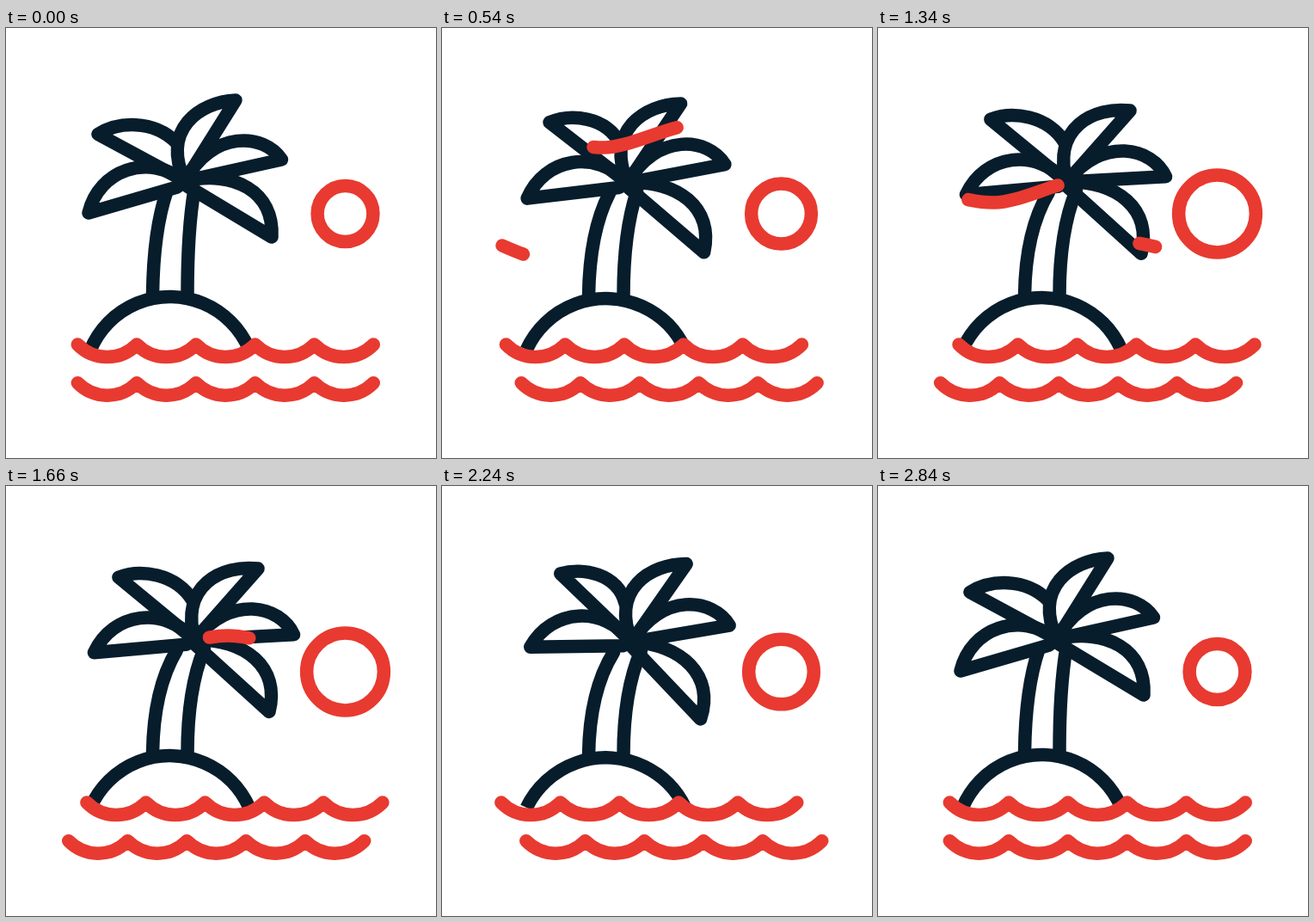
An HTML page with a canvas for the animation above (3 s loop, 500 by 500 pixels).

```html
<!DOCTYPE html>
<html lang="en">
<head>
<meta charset="utf-8">
<title>Island</title>
<style>
  html, body { margin: 0; width: 100%; height: 100%; overflow: hidden; background: #fff; }
  canvas { display: block; width: 500px; height: 500px; }
</style>
</head>
<body>
<canvas id="stage" width="500" height="500"></canvas>
<script>
const ctx = document.getElementById('stage').getContext('2d');
const LOOP = 3000;
const DARK = '#071d2c';
const RED = '#e83a30';

// The motion runs through four equal parts: rest, quarter, middle, quarter, rest.
const START = 500 / 3;
const PART = 2000 / 3;

const clamp = v => Math.min(1, Math.max(0, v));
const smooth = u => u * u * (3 - 2 * u);
const mix = (a, b, u) => a + (b - a) * u;

function sway(time, quarter, middle) {
  const keys = [0, quarter, middle, quarter, 0];
  const pos = Math.min(3.99999, Math.max(0, (time - START) / PART));
  const i = Math.floor(pos);
  return mix(keys[i], keys[i + 1], smooth(pos - i));
}

function swell(time) {
  return smooth(clamp(1 - Math.abs(time - 1500) / (2 * PART)));
}

function turner(hub, degrees) {
  const a = degrees * Math.PI / 180, c = Math.cos(a), s = Math.sin(a);
  return (x, y) => [hub[0] + x * c - y * s, hub[1] + x * s + y * c];
}

// A leaf runs from its root along the straight edge to the tip, then back along the curve.
function leaf(hub, root, tip, c1, c2, end) {
  ctx.beginPath();
  ctx.moveTo(...hub);
  ctx.lineTo(...root);
  ctx.lineTo(...tip);
  ctx.bezierCurveTo(...c1, ...c2, ...end);
  ctx.stroke();
}

function drawCrown(time, hub) {
  const loose = turner(hub, sway(time, 16, 10.3));
  const firm = turner(hub, sway(time, 3, 10.5));
  leaf(hub, hub, loose(-101, -54.5), loose(-78, -69), loose(-37, -72), firm(-10, -45));
  leaf(hub, hub, firm(59, -94), firm(17, -92), firm(-28, -60), hub);
  leaf(hub, hub, firm(112.5, -25), firm(92, -56), firm(32, -60), hub);
  leaf(hub, loose(-9, 7), loose(-112, 37), loose(-100, -13), loose(-43, -33), hub);
  leaf(hub, loose(3, 6), loose(101, 65), loose(104, 12), loose(57, -13), hub);
}

function drawTrunk(hub, drop) {
  ctx.beginPath();
  ctx.moveTo(170.5, 310 + drop);
  ctx.quadraticCurveTo(171.5, 235 + drop, hub[0] - 21, hub[1] + 12);
  ctx.moveTo(211, 310 + drop);
  ctx.quadraticCurveTo(211, 235 + drop, hub[0] + 11, hub[1] + 10);
  ctx.stroke();
}

// Circular arc over a chord: its radius and half angle.
function bow(half, sag) {
  const r = (half * half + sag * sag) / (2 * sag);
  return { r, a: Math.asin(half / r) };
}

function drawHill(drop) {
  const top = 312.5 + drop;
  const { r, a } = bow(92.3, 374 - top);
  ctx.lineCap = 'butt';
  ctx.beginPath();
  ctx.arc(190.6, top + r, r, -Math.PI / 2 - a, -Math.PI / 2 + a);
  ctx.stroke();
  ctx.lineCap = 'round';
}

function drawWave(x, y) {
  const step = 68.8, sag = 14.5;
  const { r, a } = bow(step / 2, sag);
  ctx.beginPath();
  for (let i = 0; i < 5; i++) {
    ctx.arc(x + (i + 0.5) * step, y + sag - r, r, Math.PI / 2 + a, Math.PI / 2 - a, true);
  }
  ctx.stroke();
}

const GUST = 'M70 253C95 264 130 278 163 278S242 249 286 249C299 249 310 251.5 323 254.5';
const gustPath = new Path2D(GUST);
const gustShape = document.createElementNS('http://www.w3.org/2000/svg', 'path');
gustShape.setAttribute('d', GUST);
const gustLength = gustShape.getTotalLength();
const gusts = [
  { start: START, x: 25, y: -139 },
  { start: 500, x: 0, y: 0 },
  { start: 1000, x: -28, y: -75 }
];

const rush = ms => 1 - Math.pow(1 - clamp(ms / 900), 2.3);

function drawGust(time, { start, x, y }) {
  const head = rush(time - start) * gustLength;
  const tail = rush(time - start - 233) * gustLength;
  if (head - tail < 0.01) return;
  ctx.save();
  ctx.translate(x, y);
  ctx.setLineDash([head - tail, gustLength * 2]);
  ctx.lineDashOffset = -tail;
  ctx.stroke(gustPath);
  ctx.restore();
}

function draw(time) {
  ctx.fillStyle = '#fff';
  ctx.fillRect(0, 0, 500, 500);
  ctx.lineWidth = 15.5;
  ctx.lineCap = ctx.lineJoin = 'round';

  const drop = sway(time, 3.5, 0.7);
  const hub = [208 + sway(time, 13, 11.2), 178 + drop];
  ctx.strokeStyle = DARK;
  drawTrunk(hub, drop);
  drawCrown(time, hub);
  drawHill(drop);

  ctx.strokeStyle = RED;
  ctx.beginPath();
  ctx.arc(394.5, 216, 32.4 + 13 * swell(time), 0, Math.PI * 2);
  ctx.stroke();

  const drift = sway(time, -15, 15);
  drawWave(83.3 + drift, 368);
  drawWave(83.3 - drift, 412.7);
  gusts.forEach(gust => drawGust(time, gust));
}

const origin = performance.now();
function tick() {
  draw((performance.now() - origin) % LOOP);
  requestAnimationFrame(tick);
}
tick();
</script>
</body>
</html>
```
